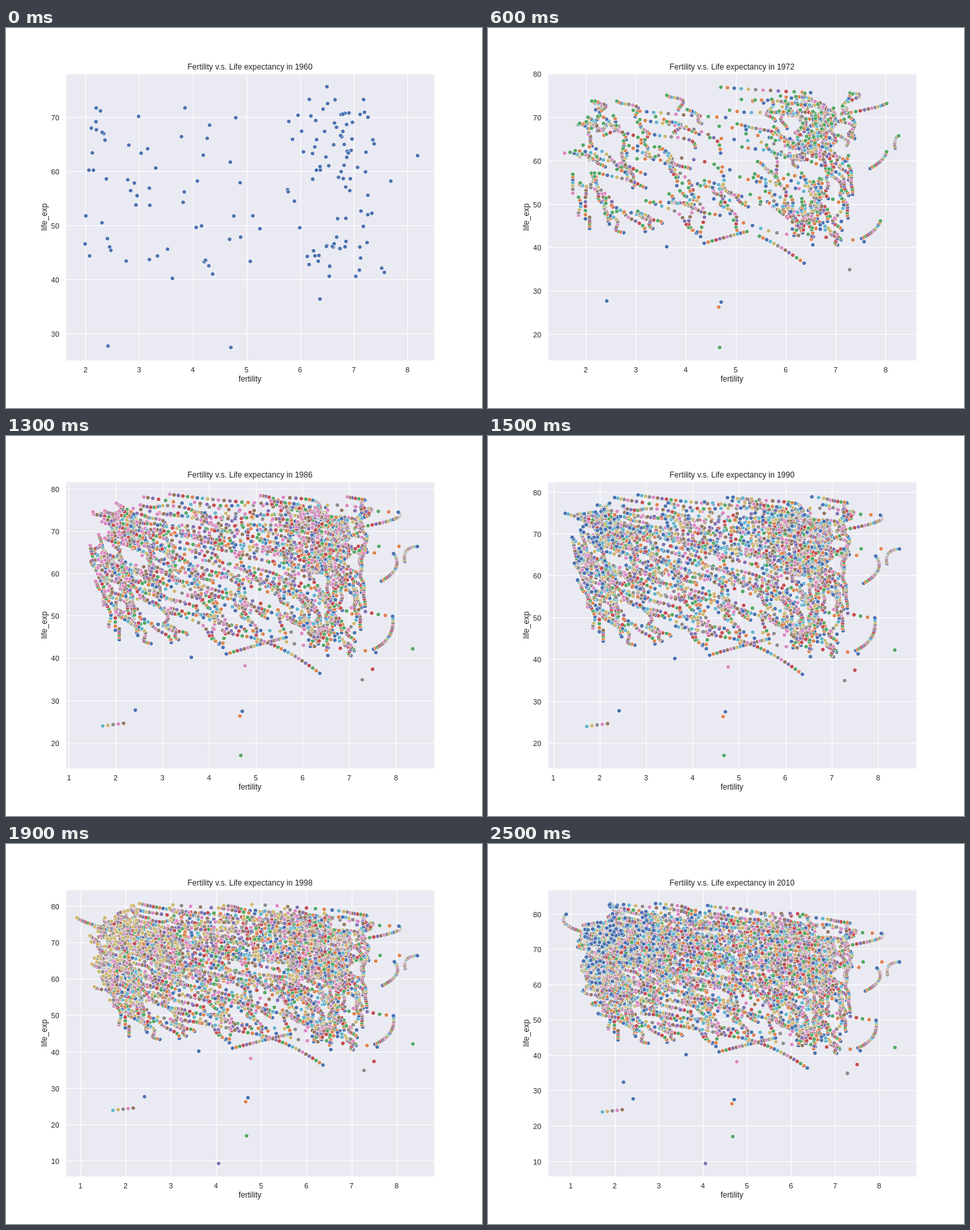
These frames come from a looping animation (720 by 576 pixels, 2.55 s). An HTML page with a canvas:

```html
<!DOCTYPE html>
<html lang="en">
<head>
<meta charset="utf-8">
<style>
  html, body { margin: 0; width: 100%; height: 100%; overflow: hidden; background: #fff; }
  canvas { display: block; }
</style>
</head>
<body>
<canvas id="chart" width="720" height="576"></canvas>
<script>
const ctx = document.getElementById('chart').getContext('2d');
const FIRST = 1960, YEARS = 51, STEP = 50;
const LEFT = 90, RIGHT = 648, TOP = 69.12, BOTTOM = 504;
const PALETTE = ['#4c72b0', '#dd8452', '#55a868', '#c44e52', '#8172b3',
                 '#937860', '#da8bc3', '#8c8c8c', '#ccb974', '#64b5cd'];

// Data extent by years since 1960
const X_MIN = [[0, 1.94], [5, 1.94], [6, 1.57], [12, 1.57], [18, 1.38], [34, 1.19], [43, .856], [50, .856]];
const X_MAX = [[0, 8.19], [12, 8.28], [19, 8.465], [50, 8.465]];
const Y_MAX = [[0, 75.75], [26, 78.75], [50, 83.3]];

// Countries on the rim of the cloud: years covered, then start, middle and end
const RIM = [
  [50, 6.5, 75.75, 3.25, 78.7, 1.9, 83],
  [50, 4.8, 70, 1.6, 74, .9, 80],
  [20, 8.19, 63, 8.23, 65.5, 8.46, 66.5],
  [20, 7.2, 71, 7.95, 72.9, 8.05, 74.6],
  [20, 7.52, 42.2, 7.86, 45.4, 7.93, 50],
  [20, 7.69, 58.3, 8, 61.5, 7.95, 64.8],
  [20, 6.37, 36.5, 5.62, 41.9, 4.9, 45],
  [20, 4.37, 41.1, 5.1, 43.4, 5.65, 45]];

// Isolated readings: year offset, fertility, life expectancy
const OUTLIERS = [
  [0, 2.42, 27.8], [0, 4.71, 27.54], [0, 3.62, 40.3], [1, 4.66, 26.4], [2, 4.68, 17.1],
  [6, 1.575, 61.8], [7, 7.28, 35], [13, 7.5, 37.5], [16, 4.77, 38.3],
  [22, 8.36, 42.3], [34, 4.06, 9.5], [50, 2.2, 32.5]];
for (let i = 0; i < 5; i++) OUTLIERS.push([15 + i, 2.17 - .112 * i, 24.7 - .16 * i]);

let seed = 1960;
const random = () => (seed = seed * 16807 % 2147483647) / 2147483647;
const between = (a, b) => a + (b - a) * random();

function interp(keys, t) {
  let i = 1;
  while (keys[i][0] < t) i++;
  const [t0, a] = keys[i - 1], [t1, b] = keys[i];
  return a + (b - a) * (t - t0) / (t1 - t0);
}

const parabola = (a, b, c, u) => a * (u - 1) * (u - 2) / 2 - b * u * (u - 2) + c * u * (u - 1) / 2;

// Fertility falls along a logistic curve while life expectancy nears a ceiling
function makeDrift(x0, y0) {
  const low = x0 > 5 ? between(1.4, 3.4) : Math.min(x0, between(1.22, 2.1));
  const mid = x0 > 7.4 ? between(4, 14) : x0 > 5 ? between(10, 55) : between(3, 30);
  const width = between(4, 9);
  const ceiling = between(74, 90), rate = between(.006, .032);
  const phase = between(0, 6), sway = between(.03, .16);
  const gapX = between(0, .4), gapY = 3 * random() ** 2;
  const fall = t => 1 / (1 + Math.exp((t - mid) / width));
  const sine = t => Math.sin(t * .25 + phase) + .5 * Math.sin(t * .7 + 2 * phase);
  const wave = t => sway * (sine(t) - sine(0));
  return (t, year) => {
    const x = low + (x0 - low) * fall(t) / fall(0) + wave(t);
    const y = y0 + (ceiling - y0) * (1 - Math.exp(-rate * t)) + 5 * wave(t * .8);
    return [
      Math.min(interp(X_MAX, year), Math.max(x, Math.min(x0, interp(X_MIN, year) + gapX))),
      Math.min(y, Math.max(y0, interp(Y_MAX, year) - gapY))];
  };
}

const tracks = RIM.map(([span, x0, y0, x1, y1, x2, y2]) => {
  const drift = makeDrift(x2, y2);
  return year => {
    const u = 2 * year / span;
    return u < 2 ? [parabola(x0, x1, x2, u), parabola(y0, y1, y2, u)] : drift(year - span, year);
  };
});
function addTracks(count, startX, startY) {
  while (count--) {
    const drift = makeDrift(startX(), startY());
    tracks.push(year => drift(year, year));
  }
}
const highFertility = () => (between(5.6, 7.6) + between(5.6, 7.6)) / 2;
addTracks(56, () => 1.98 + 3.3 * random() ** 1.4, () => between(42, 72));
addTracks(48, highFertility, () => between(60, 73.5));
addTracks(40, highFertility, () => between(40, 59));

const points = Array.from({ length: YEARS }, (_, year) => [
  ...tracks.map(track => track(year)),
  ...OUTLIERS.filter(o => o[0] === year).map(o => o.slice(1))]);

function makeScale(min, max, from, to) {
  const pad = (max - min) * .05;
  const lo = min - pad, hi = max + pad;
  const scale = v => from + (v - lo) / (hi - lo) * (to - from);
  scale.ticks = step => {
    const list = [];
    for (let v = Math.ceil(lo / step) * step; v <= hi; v += step) list.push(v);
    return list;
  };
  return scale;
}

function text(str, x, y, size, align) {
  ctx.font = size + 'px Arial, "Liberation Sans", sans-serif';
  ctx.textAlign = align;
  ctx.fillStyle = '#262626';
  ctx.fillText(str, x, y);
}

function disc(x, y, r, color) {
  ctx.fillStyle = color;
  ctx.beginPath();
  ctx.arc(x, y, r, 0, 2 * Math.PI);
  ctx.fill();
}

function draw(year) {
  const lowest = Math.min(...OUTLIERS.filter(o => o[0] <= year).map(o => o[2]));
  const sx = makeScale(interp(X_MIN, year), interp(X_MAX, year), LEFT, RIGHT);
  const sy = makeScale(lowest, interp(Y_MAX, year), BOTTOM, TOP);
  ctx.fillStyle = '#fff';
  ctx.fillRect(0, 0, 720, 576);
  ctx.fillStyle = '#eaeaf2';
  ctx.fillRect(LEFT, 69, RIGHT - LEFT, BOTTOM - 69);

  for (const v of sx.ticks(1)) {
    const x = sx(v);
    ctx.fillStyle = '#fff';
    ctx.fillRect(Math.round(x), 69, 1, BOTTOM - 69);
    text(v, x, 522, 11, 'center');
  }
  for (const v of sy.ticks(10)) {
    const y = sy(v);
    ctx.fillStyle = '#fff';
    ctx.fillRect(LEFT, Math.round(y) - 1, RIGHT - LEFT, 1);
    text(v, 80.5, y + 4, 11, 'right');
  }

  for (let i = 0; i <= year; i++) {
    for (const [px, py] of points[i]) {
      const x = sx(px), y = sy(py);
      disc(x, y, 3.24, '#fff');
      disc(x, y, 2.76, PALETTE[i % 10]);
    }
  }

  ctx.strokeStyle = '#fff';
  ctx.lineWidth = 1.25;
  ctx.strokeRect(LEFT + .5, 69.5, RIGHT - LEFT, BOTTOM - 69);
  text('Fertility v.s. Life expectancy in ' + (FIRST + year), 369, 63, 12, 'center');
  text('fertility', 369, 536, 12, 'center');
  ctx.save();
  ctx.translate(62, 286.5);
  ctx.rotate(-Math.PI / 2);
  text('life_exp', 0, 0, 12, 'center');
  ctx.restore();
}

let shown = -1;
function tick() {
  const year = Math.floor(performance.now() / STEP) % YEARS;
  if (year !== shown) draw(shown = year);
  requestAnimationFrame(tick);
}
tick();
</script>
</body>
</html>
```
